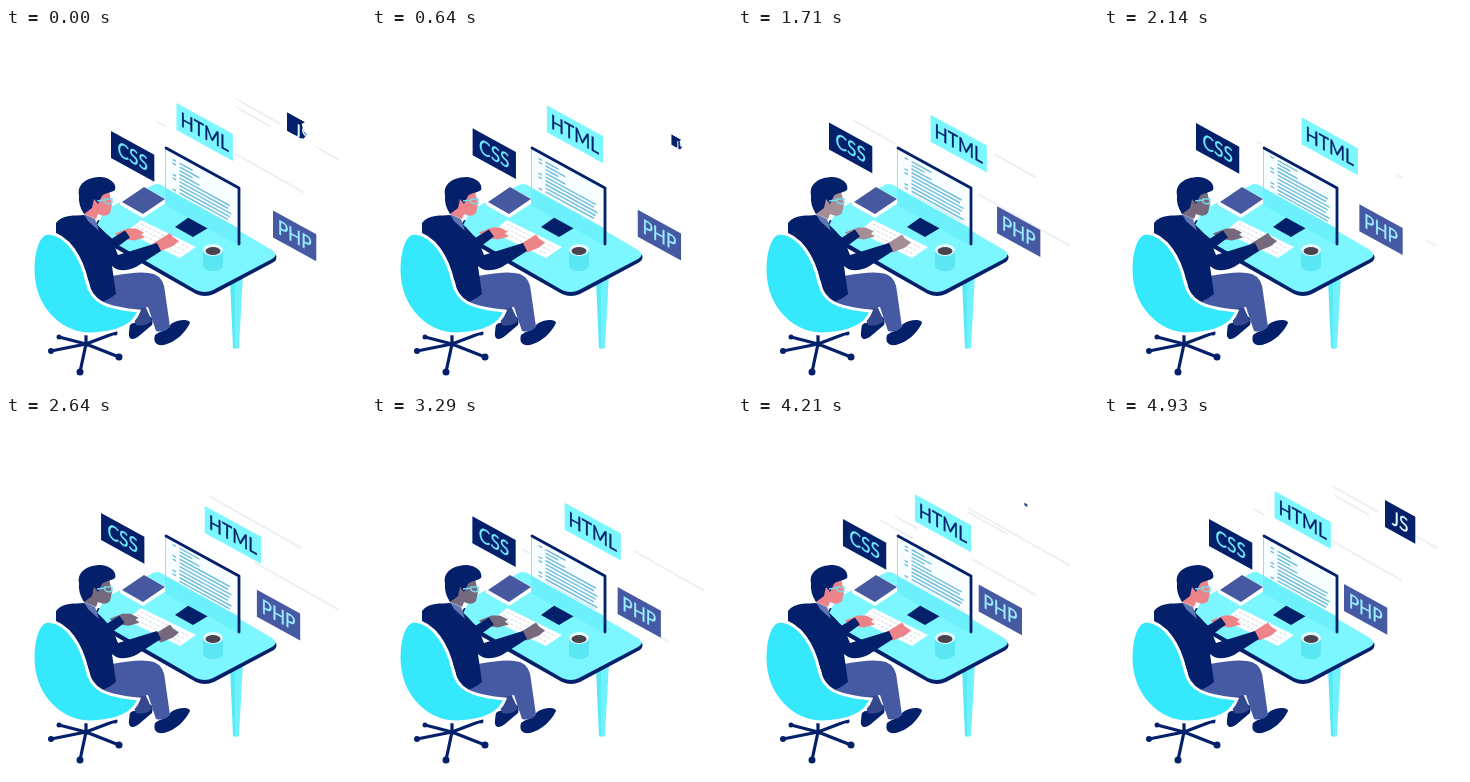
An HTML page for the animation above (5000 ms loop, 360x360 px).

```html
<!DOCTYPE html>
<html lang="en">
<head>
<meta charset="utf-8">
<title>Developer at a desk</title>
<style>
  html, body { margin: 0; height: 100%; overflow: hidden; background: #fff; }
  svg { display: block; width: 100vw; height: 100vh; }
  text { font: 20px Lato, sans-serif; text-anchor: middle; }
  .navy { fill: #04206b; }
  .aqua { fill: #7cf6ff; }
  .line { fill: none; stroke: #04206b; stroke-linecap: round; stroke-linejoin: round; }
  #scene { --skin: #ec8489; }
  .skin { fill: var(--skin); }
</style>
</head>
<body>
<svg viewBox="0 0 360 360">
  <defs>
    <clipPath id="display"><path d="M0 0H75V35H0Z"/></clipPath>
    <clipPath id="torn"><path d="M0 0H21L17 4L19 10L23 12L18 19H0Z"/></clipPath>
  </defs>
  <g id="scene">
    <g id="streaks" stroke-width="2"></g>
    <g id="panels"></g>

    <!-- desk -->
    <path fill="#59e9f7" d="M224 252L231 250L230 321L227 320Z"/>
    <path fill="#70f2fd" d="M229 250L237 246L233 320L229 321Z"/>
    <path class="navy" d="M92 192L266 225L270 227Q272 232 266 235L208 266Q199 270 190 266L84 206Z"/>
    <path class="aqua" d="M145 158Q151 154 157 158L266 222Q273 227 266 231L207 262Q199 266 190 262L88 203L99 182Z"/>

    <!-- notebook -->
    <path fill="#fff" d="M138 159L160 171V175L137 190L114 177V174Z"/>
    <path fill="#4659a0" d="M138 159L159 171L137 186L116 174Z"/>

    <!-- monitor -->
    <path class="navy" d="M183 189L202 200L187 209L169 199Z"/>
    <path fill="#6cf0fb" d="M159 120L232 160V217L159 177Z"/>
    <path fill="#f8fdff" d="M160 121L232 161V200L160 160Z"/>
    <path class="line" stroke-width="2.800" d="M160 120L233 160V216"/>
    <g transform="matrix(.866 .475 0 1 164 126)" clip-path="url(#display)">
      <g id="code" stroke="#6dbddb" stroke-width="1.600"></g>
    </g>

    <!-- keyboard -->
    <path fill="#fff" d="M135 192L190 219L174 230L120 204Z"/>
    <path fill="none" stroke="#d3dbe8" stroke-dasharray="3 1.500" d="M135 196L183 220M131 199L179 223M127 202L175 226"/>

    <!-- mug -->
    <path fill="#5be6f3" d="M197 222V237C198 245 216 245 217 237V222Z"/>
    <ellipse cx="207" cy="222" rx="10" ry="6" fill="#e4fbff"/>
    <ellipse cx="207" cy="223" rx="7.500" ry="4" fill="#49434f"/>

    <!-- legs and shoes -->
    <path class="navy" d="M124 296C130 294 135 295 139 288C145 287 148 291 146 297L133 308C127 313 122 312 123 304Z"/>
    <path class="navy" d="M149 307C155 302 160 304 165 296C172 291 184 291 184 295C179 305 170 314 158 317C150 318 147 314 149 307Z"/>
    <path fill="#34488f" d="M101 270L131 260L146 293Q139 299 130 297L124 281L96 287Z"/>
    <path fill="#465aa3" d="M86 274L106 248Q136 242 148 246Q158 250 159 264L164 299Q158 305 150 303L142 279L111 284L90 288Z"/>

    <!-- torso and head -->
    <g id="farArm">
      <path class="skin" d="M111 206L124 201L132 201L140 205L137 207L141 210L130 213L116 211Z"/>
      <path class="navy" d="M88 194L108 211L121 203L126 210L110 222L98 222Z"/>
    </g>
    <g id="nearHand">
      <path class="skin" d="M146 217L156 211L164 206L167 210L173 214L167 219L155 224Z"/>
    </g>
    <path class="navy" d="M50 195C57 186 69 188 78 187C90 194 101 205 108 217L112 227L151 215L155 223L130 239Q114 246 106 238L110 266Q98 276 87 275Q83 232 50 211Z"/>
    <path fill="#6076b4" d="M78 186L89 191L93 203L82 193Z"/>
    <path class="skin" d="M79 176L88 164L103 163L106 176L104 185Q100 190 92 186L90 191L78 186Z"/>
    <path class="navy" d="M73 167C71 156 81 149 95 149C105 150 111 156 109 162C104 166 97 164 95 170L92 176L88 171L86 180L78 186Q72 177 73 167Z"/>
    <path fill="none" stroke="#75dcec" stroke-width="1.400" d="M91 173L99 172M99 171H106V175Q102 177 99 174Z"/>

    <!-- chair -->
    <path class="line" stroke-width="3.200" d="M80 303V318M45 323L80 316L113 329M74 344L80 316L109 305M53 309L80 316"/>
    <g class="navy">
      <circle cx="45" cy="323" r="3"/><circle cx="74" cy="344" r="3.500"/>
      <circle cx="113" cy="329" r="3.500"/><circle cx="109" cy="305" r="2.500"/>
      <circle cx="53" cy="309" r="2.500"/>
    </g>
    <path fill="#35e8fb" stroke="#fff" stroke-width="3" d="M43 205C62 207 76 230 81 254C85 273 98 280 133 283C128 297 112 305 85 306C55 306 28 281 27 243C27 220 33 205 43 205Z"/>
  </g>
</svg>
<script>
const LOOP = 5000, STEPS = 70, TAU = Math.PI * 2;
const $ = id => document.getElementById(id);
const mix = (a, b, k) => a + (b - a) * k;
const clamp = v => Math.max(0, Math.min(1, v));
const ease = v => (1 - Math.cos(Math.PI * clamp(v))) / 2;

function add(parent, tag, attrs, text = '') {
  const el = document.createElementNS('http://www.w3.org/2000/svg', tag);
  for (const name in attrs) el.setAttribute(name, attrs[name]);
  el.textContent = text;
  return parent.appendChild(el);
}

function panel(label, width, fill, ink) {
  const g = add($('panels'), 'g', {});
  add(g, 'path', { d: `M0 0H${width}V27H0Z`, fill });
  add(g, 'text', { x: width / 2, y: 20.5, fill: ink, stroke: ink, 'stroke-width': .3 }, label);
  return g;
}
const css = panel('CSS', 50, '#04206b', '#70eaff');
const html = panel('HTML', 65, '#7cf6ff', '#04206b');
const php = panel('PHP', 50, '#465aa3', '#9beeff');
const js = panel('JS', 35, '#04206b', '#e4faff');

function place(el, x, y, scale = 1) {
  el.setAttribute('transform', `matrix(${.866 * scale} ${.475 * scale} 0 ${scale} ${x} ${y})`);
}

// Streaks: time of full length, left x, right x, y at the left end
const streaks = [
  [0, 230, 275, 71], [0, 230, 265, 79], [0, 228, 298, 125],
  [0, 150, 160, 93], [0, 310, 333, 119],
  [1210, 147, 190, 65], [1210, 162, 187, 60], [1210, 244, 305, 106],
  [1210, 244, 297, 127], [1210, 305, 332, 217],
  [1710, 115, 158, 92], [1710, 256, 298, 126], [1710, 240, 332, 166],
  [2640, 203, 295, 80], [2640, 248, 332, 146],
  [3290, 262, 332, 135], [3290, 150, 158, 133], [3290, 288, 297, 221],
  [4210, 230, 333, 92], [4210, 230, 270, 96], [4210, 142, 175, 104],
  [4210, 157, 180, 100], [4210, 234, 298, 143]
].map(([time, x1, x2, y]) =>
  ({ time, x1, x2, y, el: add($('streaks'), 'path', { stroke: '#eceff3' }) }));

for (let row = 0; row < 14; row++) {
  const y = 4 + row * 3.7;
  const end = row < 4 ? 26 + row % 2 * 8 : 71 - row % 3 * 2;
  const bullet = row % 4 < 2 ? `M3 ${y}h4` : '';
  add($('code'), 'path', { d: `${bullet}M11 ${y}H${end}` });
}

function drawStreaks(t) {
  for (const { time, x1, x2, y, el } of streaks) {
    const age = (t - time + LOOP * 1.5) % LOOP - LOOP / 2;
    const head = mix(x1, x2, ease((age + 520) / 400));
    const tail = mix(x1, x2, ease((age - 120) / 400));
    const at = x => `${x} ${y + (x - x1) * .565}`;
    el.setAttribute('d', head - tail > .5 ? `M${at(tail)}L${at(head)}` : '');
  }
}

function drawJs(t) {
  const leaving = t < 1500;
  js.setAttribute('visibility', leaving || t > 4150 ? 'visible' : 'hidden');
  if (leaving) {
    const k = ease(t / 1300);
    place(js, mix(281, 318, k), mix(84, 129, k), 1 - clamp(t / 1480));
    js.setAttribute('clip-path', 'url(#torn)');
  } else {
    const k = ease((t - 4080) / 670);
    place(js, mix(287, 281, k), mix(87, 84, k), k);
    js.removeAttribute('clip-path');
  }
}

function draw(now) {
  const step = Math.floor((now % LOOP + 5) * STEPS / LOOP) % STEPS;
  const t = step * LOOP / STEPS;
  const swing = (1 - Math.cos(TAU * t / LOOP)) / 2;
  const tap = Math.cos(TAU * step / 5);

  const out = t < 1700 ? ease(t / 1700) : 1 - ease((t - 1700) / 2600);
  place(css, 105 - 14 * out, 103 - 8.5 * out);
  place(html, 170.5 + 28.5 * swing, 75 + 15 * swing);
  const slide = ease(t / 4700);
  place(php, 267 - 27 * slide, 182.5 - 14.5 * slide);
  drawJs(t);
  drawStreaks(t);

  $('code').setAttribute('transform', `translate(0 ${-7 * swing})`);
  $('farArm').setAttribute('transform', `translate(${tap * 3 - 5} ${tap * 1.5 - 2})`);
  $('nearHand').setAttribute('transform', `translate(0 ${1 - tap * 2})`);
  const skin = t < 1680 || t > 3700 ? '#ec8489' : t < 1750 ? '#a58d95' : '#76687d';
  $('scene').style.setProperty('--skin', skin);
}

const start = performance.now();
function tick() {
  draw(performance.now() - start);
  requestAnimationFrame(tick);
}
tick();
</script>
</body>
</html>
```
